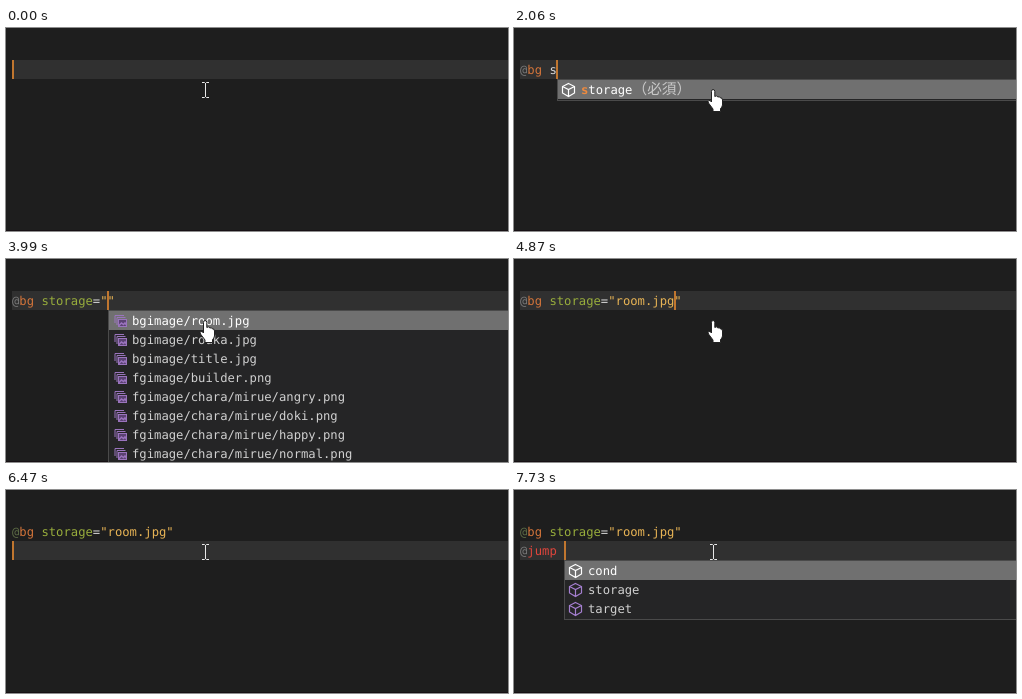
Animation of 502x203 px, one loop 8 s. Source, as an HTML page:

```html
<!DOCTYPE html>
<html lang="ja">
<head>
<meta charset="utf-8">
<style>
html, body { margin: 0; width: 100%; height: 100%; overflow: hidden; background: #1e1e1e; }
svg { display: block; }
text { font: 12.21px "DejaVu Sans Mono", monospace; white-space: pre; text-rendering: geometricPrecision; }
.cjk { font: 14.7px "Noto Sans CJK JP", "Noto Sans CJK", sans-serif; }
</style>
</head>
<body>
<svg id="stage" width="502" height="203" viewBox="0 0 502 203"></svg>
<script>
const LOOP = 8000, LEFT = 6, TOP = 32, ROW = 19, CHAR = 7.35;
const stage = document.getElementById('stage');

const tags = { icon: 'tag', items: ['bg', 'backlay', 'bg2', 'bgmopt', 'bgmovie', 'body', 'breakgame', 'button', 'call'], match: 1 };
const params = { icon: 'cube', items: ['cond', 'cross', 'method', 'position', 'storage（必須）', 'time', 'wait'], match: 0 };
const storage = { icon: 'cube', items: ['storage（必須）'], match: 1 };
const files = {
  icon: 'image', match: 0,
  items: ['bgimage/room.jpg', 'bgimage/rouka.jpg', 'bgimage/title.jpg', 'fgimage/builder.png',
    ...['angry', 'doki', 'happy', 'normal', 'sad'].map(mood => `fgimage/chara/mirue/${mood}.png`)]
};
const jump = match => ({ icon: 'tag', items: ['jump'], match });
const jumpParams = { icon: 'cube', items: ['cond', 'storage', 'target'], match: 0 };

// start time, lines, caret column (-1 when blinked off), popup, popup column, pointer
const done = '@bg storage="room.jpg"', empty = '@bg storage=""';
const steps = [
  [0, [''], 0],
  [260, ['@'], 1],
  [460, ['@b'], 2],
  [530, ['@b'], 2, tags, 2, 'hand'],
  [930, ['@b'], -1, tags, 2, 'hand'],
  [1260, ['@bg '], 4],
  [1390, ['@bg '], 4, params, 4],
  [1460, ['@bg '], 4, params, 4, 'hand'],
  [1730, ['@bg '], -1, params, 4, 'hand'],
  [2060, ['@bg s'], 5, storage, 5, 'hand'],
  [2590, ['@bg s'], -1, storage, 5, 'hand'],
  [2990, [empty], 13, null, 0, 'hand'],
  [3060, [empty], 13],
  [3190, [empty], 13, files, 13, 'hand'],
  [3460, [empty], -1, files, 13, 'hand'],
  [3990, [empty], 13, files, 13, 'hand'],
  [4470, [empty], -1, files, 13, 'hand'],
  [4870, [done], 21, null, 0, 'hand'],
  [4940, [done], 21],
  [5340, [done], 22],
  [5810, [done], -1],
  [6340, [done, ''], 0],
  [6810, [done, 'j'], 1],
  [6870, [done, 'j'], 1, jump(1), 1],
  [7000, [done, 'ju'], 2, jump(2), 2],
  [7130, [done, 'jum'], 3, jump(3), 3],
  [7530, [done, '@jump '], 6],
  [7730, [done, '@jump '], 6, jumpParams, 6]
];

const rect = (x, y, w, h, fill) => `<rect x="${x}" y="${y}" width="${w}" height="${h}" fill="${fill}"/>`;
const span = (s, fill, more = '') => `<tspan fill="${fill}" ${more}>${s}</tspan>`;
const text = (x, y, body) => `<text x="${x}" y="${y}">${body}</text>`;

function highlight(line, active) {
  return line.replace(/(@)|("[^"]*")|((?<=@)\w+)|(\w+(?==))|[^@"\w]+|\w+/g, (s, at, str, tag, key) =>
    span(s, at ? (active ? '#777' : '#5c6b45') : str ? '#e8b455' : tag ? (s === 'jump' ? '#e0453c' : '#d3743a')
      : key ? '#98ad3c' : '#d8d8d8'));
}

const icons = {
  cube: c => `<path d="M6.5 .5L12.5 3.5V10L6.5 13.5L.5 10V3.5ZM.5 3.5L6.5 6.5L12.5 3.5M6.5 6.5V13.5" fill="none" stroke="${c}" stroke-width="1.2"/>`,
  tag: c => `<path d="M4.5 1L8 4L3.5 8L.5 5ZM6 5.5H10M7 5.5V11H10M10 5.5L11.5 4L13 5.5L11.5 7ZM10 11L11.5 9.5L13 11L11.5 12.5Z" fill="none" stroke="${c}" stroke-width="1.4"/>`,
  image: () => `<g transform="translate(1.5 1)" fill="none" stroke="#9a74bd"><path d="M.5 8V.5H9.5M2.5 10V2.5H11"/>
    <rect x="4" y="4.5" width="8" height="7" fill="#5b4273"/><path d="M4 11L7 8L9 9.5L10.5 8L12 10" stroke-width="1.5"/></g>`
};

function popup({ icon, items, match }, col, line) {
  const x = Math.round(LEFT + col * CHAR), y = TOP + line * ROW;
  const h = items.length * ROW + 3;
  let out = rect(x + .5, y + .5, 520, h - 1, '#252526" stroke="#4a4a4a');
  items.forEach((item, i) => {
    const top = y + 1 + i * ROW, [, word, note] = item.match(/^([^（]*)(.*)$/);
    if (!i) out += rect(x + 1, y + 1, 520, ROW, '#707070');
    out += `<g transform="translate(${x + 5} ${top + 3})">${icons[icon](i ? '#a57fd0' : '#fff')}</g>`;
    out += text(x + 24, top + 14,
      span(word.slice(0, match), '#ee8a3e', 'font-weight="bold"') +
      span(word.slice(match), i ? '#d0d0d0' : '#fff') +
      (note && span(note, '#c8c8c8', 'class="cjk"')));
  });
  return out;
}

const pointers = {
  beam: `<path d="M196 54.5H198.5L199.5 55.5L200.5 54.5H203M199.5 55V69M196 69.5H198.5L199.5 68.5L200.5 69.5H203" fill="none" stroke="#e8e8e8"/>`,
  hand: `<path d="M197.5 63.5Q197.5 61.5 199 61.5Q200.8 61.5 200.8 63.5V68.5Q202.5 67 204 69Q205.5 68 206.5 70Q208.5 69.5 208.5 72V77Q208 79.5 206.5 80.5V83.5H199V81L194.5 75Q193.5 73 195 72.5Q196.3 72.3 197.5 74Z" fill="#fff" stroke="#222"/>`
};

function draw([, lines, caret, list, col, pointer = 'beam']) {
  const last = lines.length - 1, y = TOP + last * ROW;
  let out = rect(0, 0, 502, 203, '#1e1e1e') + rect(0, 202, 502, 1, '#171014') + rect(LEFT, y, 496, ROW, '#303030');
  lines.forEach((line, i) => out += text(LEFT, TOP + i * ROW + 14, highlight(line, i === last)));
  if (caret >= 0) out += rect(Math.floor(LEFT + caret * CHAR), y, 2, ROW, '#c0762f');
  if (list) out += popup(list, col, lines.length);
  stage.innerHTML = out + pointers[pointer];
}

let shown;
function tick() {
  const t = performance.now() % LOOP;
  const step = steps.findLast(s => s[0] <= t);
  if (step !== shown) draw(shown = step);
  requestAnimationFrame(tick);
}
tick();
</script>
</body>
</html>
```
